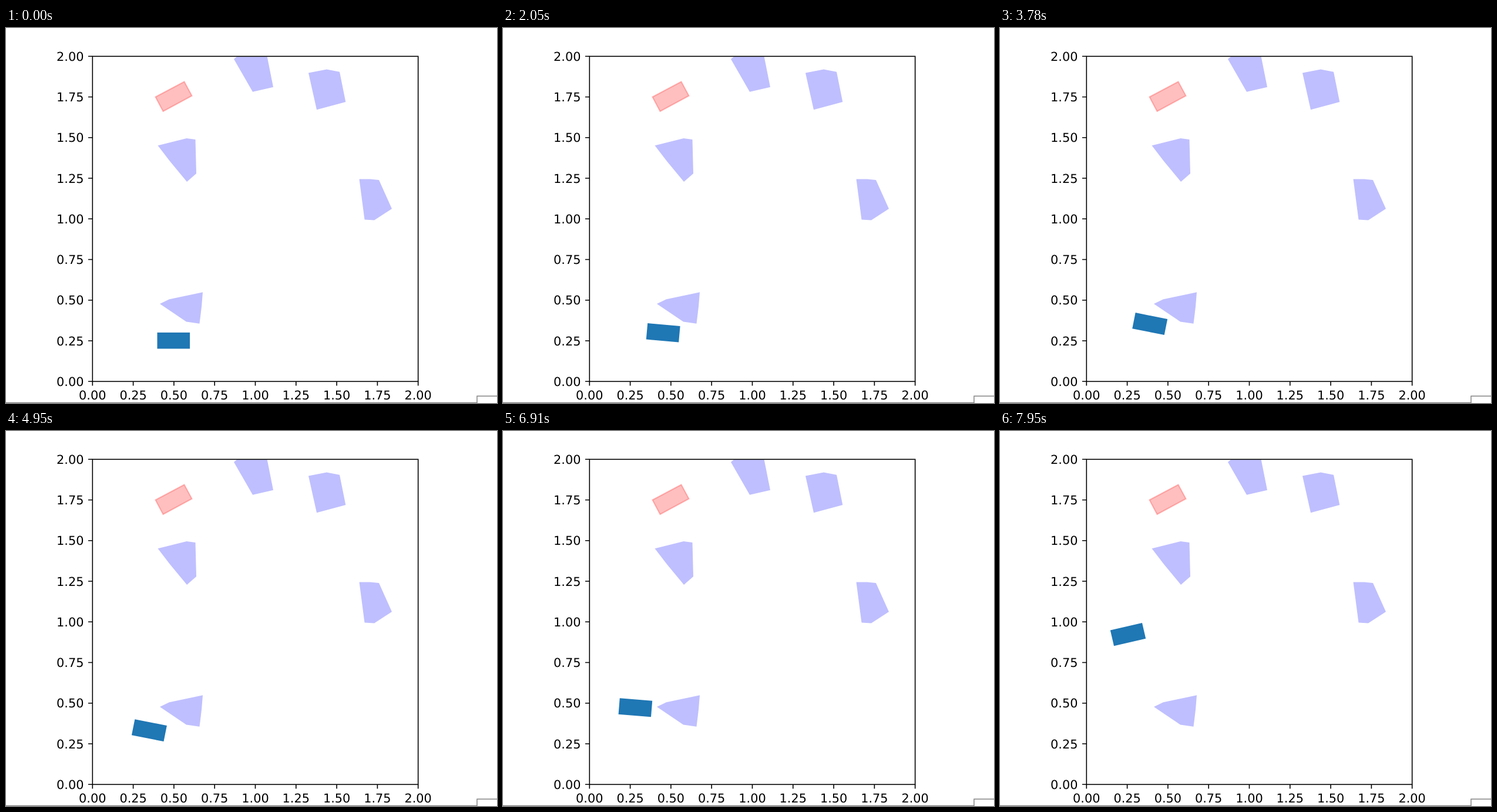
These frames come from a looping animation (836x639 px, 8 s). An HTML page:

```html
<!DOCTYPE html>
<html lang="en">
<head>
<meta charset="utf-8">
<title>Path plan</title>
<style>
  html, body { margin: 0; width: 100%; height: 100%; overflow: hidden; background: #fff; }
  svg { display: block; width: 100%; height: 100%; }
  text { font: 20.83px "DejaVu Sans", sans-serif; text-rendering: geometricPrecision; }
  .axis { fill: none; stroke: #000; stroke-width: 1.6; }
  .edge { fill: none; stroke: #858585; stroke-width: 1.5; }
</style>
</head>
<body>
<svg viewBox="0 0 836 639">
  <g fill="#bfbfff">
    <path d="M388 53L394 48H444.5L455 100.8L420 108.8Z"/>
    <path d="M515 76.5L546 70.5L568 74.8L578.3 126L529 139.3Z"/>
    <path d="M258.5 200.3L307.5 188L322.5 190L324 248L308 262L279 227Z"/>
    <path d="M601.5 257.5H620L635 259L657 308L627 327.5L610.5 326.5Z"/>
    <path d="M262 470L278 462.3L335 450.3L333 475L329.5 503.7L307 500.5Z"/>
  </g>
  <path d="M254.5 117.5L303.5 91.5L316.5 115.5L267.5 142Z" fill="red" stroke="red"
        fill-opacity=".25" stroke-opacity=".25" stroke-width="2.08"/>
  <rect id="car" x="-27.8" y="-13.8" width="55.6" height="27.6" fill="#1f77b4"/>
  <g id="axes"><rect class="axis" x="147.3" y="48.3" width="554.4" height="554"/></g>
  <path class="edge" d="M0 638.5H801.5M836 627.3H802V639"/>
</svg>
<script>
const LOOP = 8000, START = 870, STEP = 70;
const car = document.getElementById('car');
const axes = document.getElementById('axes');

// Waypoints: step, centre x, centre y, angle in degrees
const route = [
  [0, 285.3, 532.7, 0],
  [40, 257.3, 502.9, 11.3],
  [81.3, 228.2, 518.6, 11.3],
  [102, 218, 346.6, -13]
];

function add(tag, attrs, text = '') {
  const el = document.createElementNS('http://www.w3.org/2000/svg', tag);
  for (const key in attrs) el.setAttribute(key, attrs[key]);
  el.textContent = text;
  axes.append(el);
}

for (let i = 0; i <= 8; i++) {
  const x = 147.3 + i * 69.3, y = 602.3 - i * 69.25;
  const label = (i / 4).toFixed(2);
  add('path', { class: 'axis', d: `M${x} 602.3v7.3M147.3 ${y}h-7.3` });
  add('text', { x, y: 633, 'text-anchor': 'middle' }, label);
  add('text', { x: 132.5, y: y + 7.5, 'text-anchor': 'end' }, label);
}

function poseAt(step) {
  let i = 1;
  while (i < route.length - 1 && step > route[i][0]) i++;
  const a = route[i - 1], b = route[i];
  const k = Math.min(1, (step - a[0]) / (b[0] - a[0]));
  return a.map((v, j) => v + (b[j] - v) * k);
}

function draw(ms) {
  const t = ms % LOOP;
  const step = t < START ? 0 : Math.floor((t - START + 30) / STEP) + 1;
  const [, x, y, angle] = poseAt(step);
  car.setAttribute('transform', `translate(${x} ${y}) rotate(${angle})`);
}

const origin = performance.now();
function tick() {
  draw(performance.now() - origin);
  requestAnimationFrame(tick);
}
tick();
</script>
</body>
</html>
```
